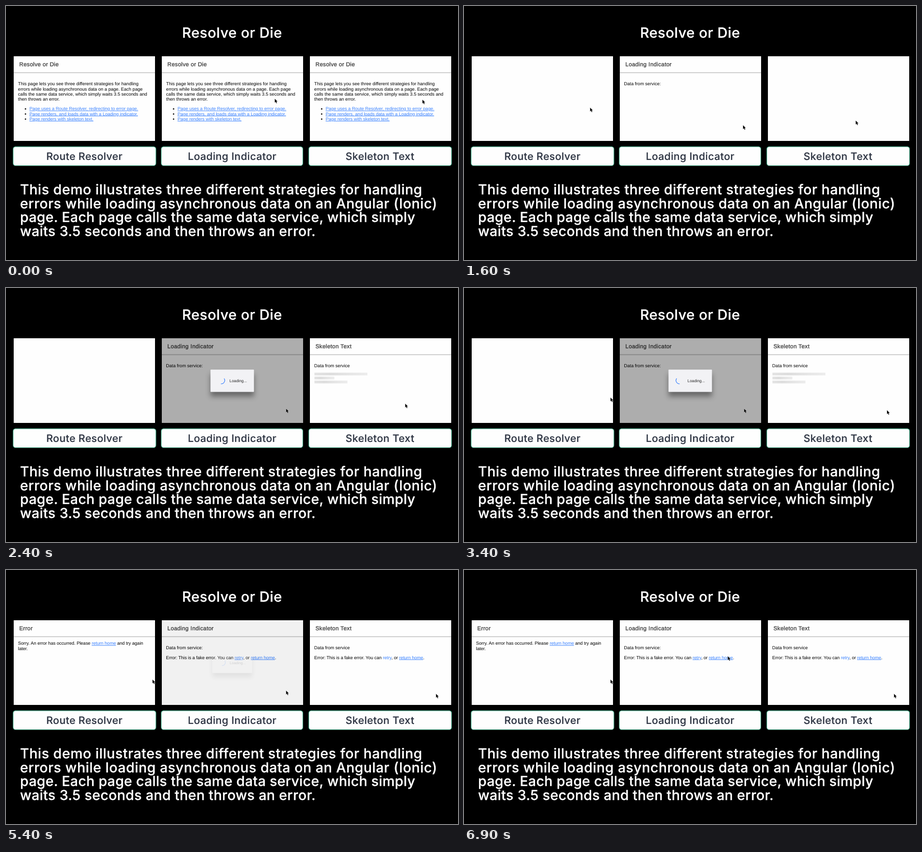
These frames come from a looping animation (998 px wide and 561 px high, 7000 ms). An HTML page:

```html
<!DOCTYPE html>
<html lang="en">
<head>
<meta charset="utf-8">
<title>Resolve or Die</title>
<style>
  html, body { margin: 0; width: 100%; height: 100%; overflow: hidden; background: #000; }
  svg { display: block; width: 998px; height: 561px; }
  text { text-rendering: geometricPrecision; }
  .big, .label { font: 500 30.4px Inter, sans-serif; font-optical-sizing: none; letter-spacing: .62px; fill: #fff; stroke: #fff; stroke-width: .35px; }
  .title { font-size: 31px; }
  .label { font-size: 22.6px; letter-spacing: .45px; fill: #2f3644; stroke: #2f3644; stroke-width: .2px; }
  .mid { text-anchor: middle; }
  .box { fill: #fefefe; stroke: #45b08c; stroke-width: 1.3px; }
  .body { font: 10.03px "Liberation Sans", Arial, sans-serif; fill: #000; }
  .bar { font: 12.5px "Liberation Sans", Arial, sans-serif; letter-spacing: .38px; fill: #424242; stroke: #424242; stroke-width: .4px; }
  .body a, .link { fill: #3880ff; }
  .body a { text-decoration: underline; }
  .tight { letter-spacing: -.04px; }
  .tighter { letter-spacing: -.07px; }
  .wait { font: 8.75px "Liberation Sans", Arial, sans-serif; fill: #262626; }
  .modal { fill: #f2f2f5; filter: drop-shadow(0 10px 6px rgba(0, 0, 0, .4)); }
  .spin { fill: none; stroke: #3880ff; stroke-width: 1.3px; }
  .cursor { filter: drop-shadow(0 .8px .7px rgba(0, 0, 0, .35)); }
</style>
</head>
<body>
<svg viewBox="0 0 998 561">
  <defs>
    <clipPath id="clip"><rect width="312" height="187"/></clipPath>
    <linearGradient id="grey">
      <stop offset="0" stop-color="#e4e4e4"/><stop offset=".3" stop-color="#dedede"/>
      <stop offset=".65" stop-color="#e6e6e6"/><stop offset="1" stop-color="#ededed"/>
    </linearGradient>
    <g id="line">
      <rect y="35" width="312" height="1" fill="#d6d6d6"/>
      <rect y="36" width="312" height="1" fill="#cacaca"/>
      <rect y="37" width="312" height="1" fill="#f0f0f0"/>
    </g>
    <g id="home">
      <text class="bar" x="12.3" y="22.4">Resolve or Die</text>
      <use href="#line"/>
      <g class="body">
        <text x="9.6" y="64.2">This page lets you see three different strategies for handling</text>
        <text x="9.6" y="75.5">errors while loading asynchronous data on a page. Each page</text>
        <text x="9.6" y="86.8">calls the same data service, which simply waits 3.5 seconds and</text>
        <text x="9.6" y="98">then throws an error.</text>
        <g class="tight">
          <text x="34.7" y="119.2"><a>Page uses a Route Resolver, redirecting to error page.</a></text>
          <text x="34.7" y="130.5"><a>Page renders, and loads data with a Loading indicator.</a></text>
          <text x="34.7" y="141.8"><a>Page renders with skeleton text.</a></text>
        </g>
        <circle cx="26" cy="116.2" r="1.5"/><circle cx="26" cy="127.5" r="1.5"/><circle cx="26" cy="138.8" r="1.5"/>
      </g>
    </g>
    <path id="arrow" class="cursor" d="M0 0V8.2L1.9 6.6L3.3 9.8L4.7 9.2L3.3 6.1H5.8Z" stroke="#fff" stroke-width=".9" paint-order="stroke"/>
  </defs>

  <rect width="998" height="561"/>
  <text class="big title mid" x="499.3" y="69.6">Resolve or Die</text>

  <g transform="translate(17 111)" clip-path="url(#clip)">
    <rect width="312" height="187" fill="#fefefe"/>
    <use id="home1" href="#home"/>
    <g id="page1">
      <text class="bar" x="12.3" y="22.4">Error</text>
      <use href="#line"/>
      <g class="body tight">
        <text x="9.6" y="54.2">Sorry. An error has occurred. Please <a>return home</a> and try again</text>
        <text x="9.6" y="65.5">later.</text>
      </g>
    </g>
    <use id="cur1" href="#arrow"/>
  </g>

  <g transform="translate(344 111)" clip-path="url(#clip)">
    <rect width="312" height="187" fill="#fefefe"/>
    <use id="home2" href="#home"/>
    <g id="page2">
      <text class="bar" x="12.3" y="22.4">Loading Indicator</text>
      <use href="#line"/>
      <text class="body" x="9.3" y="64.2">Data from service:</text>
      <text id="err2" class="body tighter" x="9.3" y="85.6">Error: This is a fake error. You can <a>retry</a>, or <a>return home</a>.</text>
    </g>
    <rect id="shade" width="312" height="187"/>
    <g id="modal">
      <rect class="modal" x="107.5" y="69.2" width="96" height="49.3" rx="1.2"/>
      <path id="spin" class="spin" d="M-6.76 -3A7.4 7.4 0 0 1 6.76 -3"/>
      <text class="wait" x="149.6" y="96.8">Loading...</text>
    </g>
    <use id="cur2" href="#arrow"/>
  </g>

  <g transform="translate(671 111)" clip-path="url(#clip)">
    <rect width="312" height="187" fill="#fefefe"/>
    <use id="home3" href="#home"/>
    <g id="page3">
      <text class="bar" x="12.3" y="22.4">Skeleton Text</text>
      <use href="#line"/>
      <text class="body" x="9.6" y="64.2">Data from service</text>
      <g id="bones" fill="url(#grey)">
        <rect x="10" y="76" width="117" height="6"/>
        <rect x="10" y="84.8" width="44" height="6"/>
        <rect x="10" y="93.6" width="73" height="6"/>
      </g>
      <text id="err3" class="body tighter" x="9.6" y="85.6">Error: This is a fake error. You can <tspan class="link">retry</tspan>, or <a>return home</a>.</text>
    </g>
    <use id="cur3" href="#arrow"/>
  </g>

  <rect class="box" x="15.8" y="310.8" width="315.2" height="41.8" rx="5"/>
  <rect class="box" x="342.8" y="310.8" width="312.6" height="41.8" rx="5"/>
  <rect class="box" x="668.6" y="310.8" width="315.2" height="41.8" rx="5"/>
  <text class="label mid" x="173.3" y="340">Route Resolver</text>
  <text class="label mid" x="499.3" y="340">Loading Indicator</text>
  <text class="label mid" x="825.8" y="340">Skeleton Text</text>

  <g class="big">
    <text x="31" y="416.4">This demo illustrates three different strategies for handling</text>
    <text x="31" y="446.9">errors while loading asynchronous data on an Angular (Ionic)</text>
    <text x="31" y="477.3" style="letter-spacing:.35px">page. Each page calls the same data service, which simply</text>
    <text x="31" y="507.8" style="letter-spacing:.42px">waits 3.5 seconds and then throws an error.</text>
  </g>
</svg>
<script>
  const LOOP = 7000, STEP = 100;
  const $ = id => document.getElementById(id);

  // Pointer stops: [time, x, y] inside each panel
  const paths = {
    cur1: [[300, 318, 125], [1000, 261.5, 113.5], [1900, 261.5, 113.5], [2200, 318, 129], [2700, 315, 132], [3100, 306.5, 131]],
    cur2: [[200, 249.5, 94], [900, 252.5, 126], [1200, 252.5, 126], [1700, 274.5, 155.5], [6400, 274.5, 155.5], [6900, 238.5, 79.5]],
    cur3: [[200, 248.5, 96], [900, 165, 144], [1100, 163.5, 138], [1300, 163.5, 138], [1800, 210.5, 144.5],
           [2800, 210.5, 144.5], [3400, 263, 159], [3700, 278.5, 162.5]]
  };

  const ease = (t, from, to) => {
    const p = Math.min(1, Math.max(0, (t - from) / (to - from)));
    return p * p * (3 - 2 * p);
  };
  const show = (id, on) => { $(id).style.display = on ? '' : 'none'; };
  const move = (id, transform) => $(id).setAttribute('transform', transform);
  const fade = (id, opacity) => $(id).setAttribute('opacity', opacity);

  function pointAt(stops, t) {
    let [, x, y] = stops[0];
    for (let i = 1; i < stops.length; i++) {
      const [a, x0, y0] = stops[i - 1], [b, x1, y1] = stops[i];
      if (t > a) {
        const p = ease(t, a, b);
        x = x0 + (x1 - x0) * p;
        y = y0 + (y1 - y0) * p;
      }
    }
    return [x, y];
  }

  // A new page slides up while it fades in
  function enter(id, t, start) {
    const p = ease(t, start, start + 280);
    fade(id, p);
    move(id, `translate(0 ${25 * (1 - p)})`);
  }

  function render(t) {
    show('home1', t < 1500);
    show('home2', t < 1100);
    show('home3', t < 1500);
    enter('page1', t, 5000);
    enter('page2', t, 1300);
    enter('page3', t, 1900);
    show('err2', t >= 5200);
    show('bones', t < 5400);
    show('err3', t >= 5400);

    const opened = ease(t, 1720, 1920), closed = ease(t, 5250, 5450);
    const alpha = opened * (1 - closed);
    const scale = 1.1 - .1 * opened - .1 * closed;
    fade('shade', .32 * alpha);
    fade('modal', alpha);
    move('modal', `translate(155.5 94) scale(${scale}) translate(-155.5 -94)`);
    move('spin', `translate(131.5 93.2) rotate(${193 + (t - 1800) * 360 / 750})`);

    for (const id in paths) move(id, `translate(${pointAt(paths[id], t)})`);
  }

  const begin = performance.now();
  function tick() {
    const t = (performance.now() - begin) % LOOP;
    render(Math.floor(t / STEP) * STEP);
    requestAnimationFrame(tick);
  }
  tick();
</script>
</body>
</html>
```
